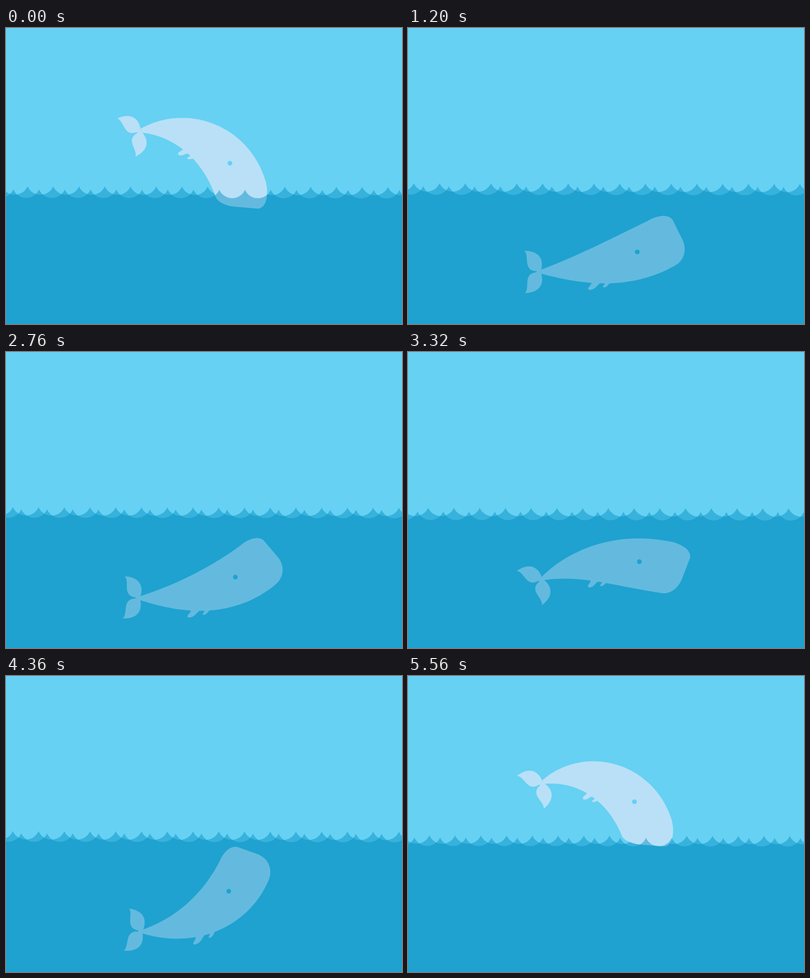
An HTML page with a canvas for the animation above (5600 ms loop, 800x600 px).

```html
<!DOCTYPE html>
<html lang="en">
<head>
<meta charset="utf-8">
<title>Whale</title>
<style>
  html, body { margin: 0; width: 100%; height: 100%; overflow: hidden; background: #66d1f3; }
  canvas { display: block; width: 800px; height: 600px; }
</style>
</head>
<body>
<canvas id="stage" width="800" height="600"></canvas>
<script>
const ctx = document.getElementById('stage').getContext('2d');
const LOOP = 5600;
const SKY = '#66d1f3', SEA = 'rgba(5,145,195,0.48)', SKIN = '#b9e0f7';
const RAD = Math.PI / 180;

// Waves: rows of scallops, each row riding a small circle
const SWELL = 800, PITCH = 52, DIP = 17, ORBIT = 6.5;
const DIP_R = (PITCH * PITCH / 4 + DIP * DIP) / (2 * DIP);
const DIP_A = Math.asin(PITCH / 2 / DIP_R);

function drawWave(t, x0, lag) {
  const ang = 2 * Math.PI * (t - lag) / SWELL;
  const left = x0 + ORBIT * Math.cos(ang) - 2 * PITCH;
  const top = 321 - ORBIT * Math.sin(ang);
  ctx.beginPath();
  ctx.moveTo(left, 620);
  for (let x = left; x < 860; x += PITCH) {
    const y = top + x * 0.0016;
    ctx.arc(x + PITCH / 2, y + DIP - DIP_R, DIP_R, Math.PI / 2 + DIP_A, Math.PI / 2 - DIP_A, true);
  }
  ctx.lineTo(900, 620);
  ctx.fillStyle = SEA;
  ctx.fill();
}

// Whale poses: time, tail x, tail y, tail heading, bend (degrees)
const POSES = [
  [0, 273, 208, -12, 98],
  [160, 300, 208, 22, 68],
  [320, 322, 252, 56, 22],
  [640, 316, 377, 61, -58],
  [800, 297, 432, 46, -67],
  [1160, 270, 494, 2, -24],
  [1440, 270, 460, -26, 54],
  [1800, 272, 420, -2, 57],
  [2080, 274, 404, 20, 42],
  [2540, 276, 478, 15, -28],
  [2760, 271, 499, 0, -21],
  [3040, 268, 488, -18, 25],
  [3320, 272, 459, -27, 66],
  [3600, 272, 418, -2, 63],
  [3860, 277, 404, 20, 42],
  [4100, 287, 452, 24, -34],
  [4360, 276, 518, -1, -60],
  [4540, 290, 532, -30, -42],
  [4800, 302, 445, -60, -4],
  [5000, 290, 335, -62, 42],
  [5360, 272, 203, -44, 112],
  [5560, 273, 215, -24, 110]
];

function poseKey(i) {
  const n = POSES.length, turn = Math.floor(i / n);
  const key = POSES[i - turn * n].slice();
  key[0] += turn * LOOP;
  return key;
}

// Smooth cyclic interpolation between poses
function poseAt(t) {
  let i = POSES.length - 1;
  while (POSES[i][0] > t) i--;
  const [k0, k1, k2, k3] = [-1, 0, 1, 2].map(d => poseKey(i + d));
  const span = k2[0] - k1[0], u = (t - k1[0]) / span;
  const u2 = u * u, u3 = u2 * u;
  return k1.slice(1).map((p, j) => {
    const q = k2[j + 1];
    const m = (q - k0[j + 1]) / (k2[0] - k0[0]) * span;
    const n = (k3[j + 1] - p) / (k3[0] - k1[0]) * span;
    return (2 * u3 - 3 * u2 + 1) * p + (u3 - 2 * u2 + u) * m
         + (3 * u2 - 2 * u3) * q + (u3 - u2) * n;
  });
}

// Returns a function that places (s along the spine, v towards the belly) on the stage
function makeSpine([x, y, tilt, bend], droop) {
  const heading = s => { const u = s / 295; return (tilt + bend * u + droop * u * u) * RAD; };
  const pts = [];
  for (let s = 0; s <= 302; s++) {
    pts.push([x, y]);
    const h = heading(s + 0.5);
    x += Math.cos(h);
    y += Math.sin(h);
  }
  return (s, v) => {
    const i = Math.floor(s), f = s - i, h = heading(s);
    const [px, py] = pts[i], [qx, qy] = pts[i + 1];
    return [px + (qx - px) * f - v * Math.sin(h), py + (qy - py) * f + v * Math.cos(h)];
  };
}

function bezier(p0, p1, p2, p3, steps = 12) {
  return Array.from({ length: steps + 1 }, (_, i) => {
    const t = i / steps, r = 1 - t;
    return [0, 1].map(k => r * r * r * p0[k] + 3 * r * r * t * p1[k] + 3 * r * t * t * p2[k] + t * t * t * p3[k]);
  });
}

const girth = s => 4 + 49 * Math.sin(Math.PI / 2 * Math.min(1, s / 240));

const flank = [];
for (let s = 0; s <= 252; s += 6) flank.push([s, girth(s)]);

const BODY = [
  ...flank.map(([s, w]) => [s, -w]),
  ...bezier([258, -53], [280, -51], [298, -43], [298, -28]),
  ...bezier([291, 17], [288, 35], [275, 53], [254, 53]),
  ...flank.slice().reverse()
];

const FIN = [
  ...bezier([-9, -4], [-8, 2], [-18, 5], [-17, 9]),
  ...bezier([-17, 9], [-16, 13], [-6, 12], [0, 6]),
  [10, -1], [8, -6]
];
const fin = (s, size) => FIN.map(([x, y]) => [s + x * size, girth(s) + y * size]);
const FINS = [fin(106, 1), fin(127, 0.58)];

const LOBE = [
  ...bezier([0, 2], [6, 22], [0, 42], [-33, 43]),
  ...bezier([-33, 43], [-22, 32], [-38, 3], [-9, 1])
];
const FLUKE = [...LOBE, ...LOBE.map(([x, y]) => [x, -y]).reverse()];

function trace(points, place) {
  points.forEach(([s, v], i) => {
    const p = place(s, v);
    if (i) ctx.lineTo(p[0], p[1]);
    else ctx.moveTo(p[0], p[1]);
  });
  ctx.closePath();
}

function fillShape(points, place) {
  ctx.beginPath();
  trace(points, place);
  ctx.fill();
}

function drawWhale(t) {
  const pose = poseAt(t), [x, y, tilt, bend] = pose;
  const spine = makeSpine(pose, -28 * Math.sin(Math.PI * t / LOOP));
  const turn = (tilt - 0.135 * bend) * RAD, cos = Math.cos(turn), sin = Math.sin(turn);
  ctx.fillStyle = SKIN;
  fillShape(FLUKE, (p, q) => [x + p * cos - q * sin, y + p * sin + q * cos]);
  FINS.forEach(f => fillShape(f, spine));

  // The eye winds the other way, so it stays open
  ctx.beginPath();
  trace(BODY, spine);
  const [ex, ey] = spine(200, -4);
  ctx.moveTo(ex + 4.8, ey);
  ctx.arc(ex, ey, 4.8, 0, 2 * Math.PI, true);
  ctx.fill();
}

function draw(t) {
  ctx.fillStyle = SKY;
  ctx.fillRect(0, 0, 800, 600);
  drawWave(t, 37, 0);
  drawWhale(t);
  drawWave(t, 13.3, 170);
}

const start = performance.now();
function tick() {
  const t = (performance.now() - start) % LOOP;
  draw(Math.floor(t / 40) * 40);
  requestAnimationFrame(tick);
}
tick();
</script>
</body>
</html>
```
